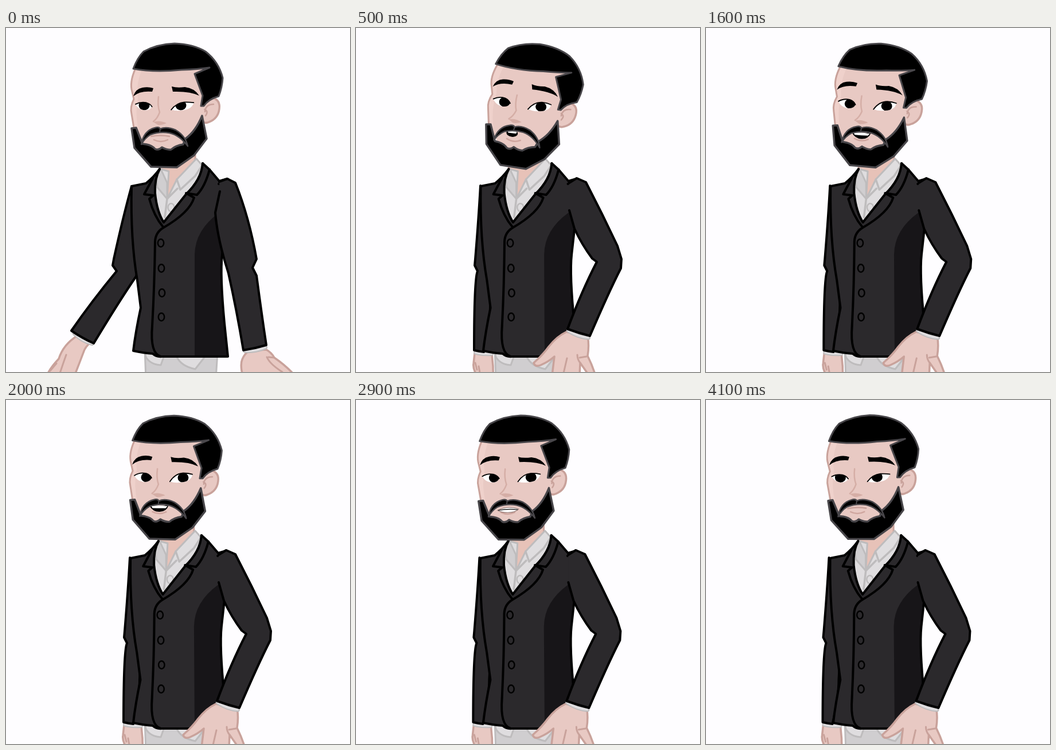
Write an HTML page with a canvas that moves like this. It is 600 by 600 pixels and loops after 4200 ms.

```html
<!DOCTYPE html>
<html lang="en">
<head>
<meta charset="utf-8">
<style>
html, body { margin: 0; width: 100%; height: 100%; overflow: hidden; background: #fefdff; }
canvas { display: block; width: 600px; height: 600px; }
</style>
</head>
<body>
<canvas id="stage" width="600" height="600"></canvas>
<script>
const ctx = document.getElementById("stage").getContext("2d");
const LOOP = 4200, STEP = 100;
const C = {
  bg: "#fefdff", skin: "#e8c9c3", glow: "#efd1cb", neck: "#e7c2b8", skinLine: "#c9a29b",
  shirt: "#dfdddf", shirtDark: "#d0ced0", shirtLine: "#bebcbd",
  suit: "#2b292c", shade: "#171518", hairLine: "#48464a"
};

const clamp = x => Math.max(0, Math.min(1, x));
const smooth = x => { x = clamp(x); return x * x * (3 - 2 * x); };
const mix = (a, b, k) => a + (b - a) * k;

// Interpolates the numbers of two path strings that share one structure.
function blend(a, b, k) {
  const to = b.match(/-?[\d.]+/g);
  let i = 0;
  return a.replace(/-?[\d.]+/g, n => mix(+n, +to[i++], k).toFixed(2));
}

function shape(d, fill, line, width) {
  const path = new Path2D(d);
  if (fill) { ctx.fillStyle = fill; ctx.fill(path); }
  if (line) { ctx.strokeStyle = line; ctx.lineWidth = width; ctx.stroke(path); }
  return path;
}

function oval(x, y, rx, ry, fill, line, width) {
  ctx.beginPath();
  ctx.ellipse(x, y, rx, ry, 0, 0, Math.PI * 2);
  if (fill) { ctx.fillStyle = fill; ctx.fill(); }
  if (line) { ctx.strokeStyle = line; ctx.lineWidth = width; ctx.stroke(); }
}

// Each pair: arms open, arms down.
const ARMS = {
  left: [
    "M219 276 Q204 330 188 403 L186 414 L193 424 Q150 476 114 528 Q133 541 153 550 Q195 480 227 433 L240 380 Z",
    "M217 275 Q214 330 208 403 L207 414 L212 424 Q206 438 206 562 Q214 564 223 565 Q234 520 234 487 L240 380 Z"],
  leftCuff: ["M120 533 Q133 546 150 550", "M209 566 Q220 569 236 568"],
  leftHand: [
    "M148 548 Q138 556 135 566 Q126 590 118 610 L70 610 Q74 596 92 577 Q100 552 124 537 Z",
    "M237 568 Q238 580 239 590 Q239 600 240 612 L215 612 Q203 596 205 585 Q206 576 207 567 Z"],
  leftFinger: ["M105 570 Q100 584 94 602 M88 585 L77 598", "M214 590 Q215 596 217 606 M208 584 L211 596"],
  right: [
    "M372 268 L386 263 L400 270 Q424 330 437 403 L430 418 L437 432 Q446 500 454 553 Q434 559 414 562 Q402 490 388 428 L382 408 Q368 360 365 322 L373 285",
    "M372 270 L385 262 L401 269 Q430 325 456 380 L463 403 L462 419 Q441 460 408 537 Q388 532 369 525 Q394 458 420 408 L412 402 Q394 378 381 350 L372 318"],
  rightCuff: ["M417 563 Q435 564 452 557", "M371 528 Q388 539 405 540"],
  rightHand: [
    "M454 561 Q463 566 468 575 Q487 588 502 604 L484 605 L476 606 L470 608 L420 612 L420 611 Q416 610 414 605 Q412 602 411 598 Q409 585 412 578 Q416 568 424 563 Z",
    "M404 538 Q407 553 404 572 Q412 588 417 604 L405 604 L391 584 L390 606 L342 606 L346 573 Q336 582 322 588 Q312 592 310 584 Q326 570 336 556 Q350 538 367 530 Z"],
  rightFinger: [
    "M455 574 Q460 586 482 600 M468 575 L458 574 M430 604 L430 610",
    "M386 570 Q386 578 391 584 M402 573 L390 575 M368 576 L362 602"]
};

function drawArm(side, k) {
  const part = name => blend(...ARMS[side + name], k);
  shape(part("Hand"), C.skin, C.skinLine, 3.5);
  shape(part("Finger"), null, C.skinLine, 3);
  shape(part("Cuff"), null, C.shirtLine, 8);
  shape(part("Cuff"), null, C.shirt, 4);
  shape(part(""), C.suit, "#000", 4);
}

function drawTorso() {
  // Neck and shirt
  shape("M270 225 L266 262 L282 300 L330 250 L330 215 Z", C.neck, C.skinLine, 3);
  shape("M270 246 L259 262 L258 290 L266 322 L276 340 L316 290 L348 246 L332 228 L298 264 L281 298 L284 250 Z", C.shirt, C.shirtLine, 3);
  shape("M270 246 L262 262 L264 278 L281 298 L281 270 Z", C.shirtDark, C.shirtLine, 3);
  shape("M281 298 L277 330 M298 264 L304 282 L330 258 L342 240 M281 298 L299 280", null, C.shirtLine, 3.5);
  oval(288, 313, 5.5, 7, null, C.shirtLine, 2.5);
  // Jacket
  shape("M268 246 Q258 260 244 271 L219 276 Q217 370 229 440 L235 488 Q226 530 222 563 Q240 567 256 568 Q262 574 272 573 L387 573 L381 515 Q373 430 378 395 L383 352 L396 270 L386 263 L372 267 L355 247 L343 236 Q340 262 314 290 L275 339 Q263 320 260 288 Q259 262 268 246 Z", C.suit);
  shape("M372 322 Q330 352 329 395 L329 572 L386 572 L380 515 Q373 430 377 395 L382 352 Z", C.shade);
  shape("M268 246 Q258 260 244 271 L219 276 Q217 370 229 440 L235 488 Q226 530 222 563 Q240 567 256 568 Q262 574 272 573 L387 573 L381 515 Q373 430 377 395 L382 352 M386 263 L372 267 L355 247 L343 236", null, "#000", 4);
  // Lapels and front edge
  shape("M268 246 Q259 262 260 288 Q263 320 275 339 L314 290 Q341 264 343 236 M256 262 L241 290 L257 292 L250 298 Q258 328 274 347 M355 247 Q347 277 333 291 L314 288 L328 296 Q320 322 275 348 Q261 356 260 372 Q259 450 255 520 Q251 568 270 573 M386 263 L371 272", null, "#000", 4);
  [[270, 375], [271, 419], [272, 462], [271, 504]].forEach(([x, y]) => oval(x, y, 5.2, 6.8, null, "#000", 2.5));
}

function drawHips() {
  shape("M242 560 L244 612 L366 612 L369 565 Z", C.shirtDark, C.shirtLine, 3);
  shape("M242 560 L244 574 Q252 587 270 588 L280 560 Z", C.shirt, C.shirtLine, 3);
  shape("M294 560 L298 574 Q306 590 330 595 L348 572 L346 560 Z", C.shirt, C.shirtLine, 3);
}

function drawEye(lid, low, x, pose) {
  const top = blend(...lid, 1 - pose.open), outline = top + blend(...low, 1 - pose.open);
  const path = shape(outline, "#fff");
  ctx.save();
  ctx.clip(path);
  oval(x + pose.gaze, 135, 9.5, 8.5, "#000");
  ctx.restore();
  shape(top, null, "#000", 1.8);
}

const MOUTHS = {
  closed() {
    shape("M253 189 Q270 186 285 189", null, C.skinLine, 2.5);
  },
  round() {
    oval(266, 187, 10, 6.5, "#000");
    shape("M258 184 Q266 178 274 184 L273 187 L259 187 Z", "#fff");
  },
  smile() {
    shape("M253 185 Q270 183 286 184 Q282 195 270 195 Q259 195 253 185 Z", "#000");
    shape("M256 185 Q270 183 284 185 L281 188.5 Q269 189 258 188.5 Z", "#fff");
  },
  teeth() {
    shape("M252 192 Q270 183 289 190 Q283 196 270 196 Q259 196 252 192 Z", "#fff", "#8d706b", 1);
    shape("M254 192 Q270 189 287 191", null, "#222", 1.3);
  }
};
const SPEECH = [[0, "closed"], [200, "round"], [700, "smile"], [2900, "teeth"], [3600, "closed"]];

function drawHead(pose, mouth) {
  ctx.save();
  ctx.translate(267 + pose.x, 243 + pose.y);
  ctx.rotate(pose.tilt);
  ctx.translate(-267, -243);

  // Ear and face
  shape("M343 134 Q350 122 361 122 Q374 126 372 141 Q370 158 354 164 Q346 168 340 160 Z", C.skin, C.skinLine, 3.5);
  shape("M362 133 Q348 133 347 146 M346 142 Q354 145 348 153", null, C.skinLine, 2.5);
  shape("M228 66 Q216 90 219 107 L223 124 Q216 138 219 150 L224 180 L250 215 L310 215 L344 165 L350 60 Z", C.skin);
  shape("M228 66 Q216 90 219 107 L223 124 Q216 138 219 150 L224 180 L232 180 Q224 150 230 122 Q226 95 240 66 Z", C.glow);
  shape("M228 66 Q216 90 219 107 L223 124 Q216 138 219 150 L224 180", null, C.skinLine, 3);
  shape("M266 120 Q264 135 268 147 Q264 158 257 163", null, "#d5aea6", 2.5);
  shape("M257 164 Q268 160 280 166 Q270 170 265 169 Z", "#d5aea6");

  // Eyes and brows
  drawEye(["M226 132 Q235 126 246 128 Q253 130 256 136", "M226 138 Q233 142 238 143 Q243 144 247 144"],
    ["Q253 144 241 143 Q230 141 226 132 Z", "Q242 146 236 145 Q230 143 226 138 Z"], 241, pose);
  drawEye(["M288 142 Q297 128 311 127 Q320 127 327 129", "M289 146 Q300 145 310 143 Q320 141 329 137"],
    ["Q326 141 308 143 Q297 145 288 142 Z", "Q318 145 308 146 Q296 147 289 146 Z"], 305, pose);
  ctx.save();
  ctx.translate(0, pose.brow);
  shape("M222 119 Q226 106 238 104 Q248 102 257 105 L255 111 Q234 109 222 119 Z", "#000");
  ctx.translate(0, -pose.brow * 0.5);
  shape("M289 102 Q298 105 312 103 Q329 105 337 118 Q321 110 291 111 Z", "#000");
  ctx.restore();

  // Hair
  shape("M222 71 Q229 52 240 41 Q264 28 294 27 Q326 28 348 41 Q371 59 378 87 Q377 104 371 119 Q353 124 345 136 L340 136 L343 118 L329 80 L355 69 Q335 72 306 73 Q258 78 222 71 Z", "#000", C.hairLine, 3);

  // Beard, mouth, moustache
  ctx.save();
  ctx.translate(0, pose.jaw);
  shape("M219 175 L227 174 L238 202 L245 203 Q255 205 260 211 Q266 214 272 208 Q281 213 288 212 Q296 205 309 203 L313 193 Q331 180 342 153 L350 193 L328 222 L298 243 L253 242 L224 209 Z", "#000", C.hairLine, 3.5);
  shape("M258 195 Q270 201 282 195", null, "#cfa69f", 2.5);
  ctx.restore();
  MOUTHS[mouth]();
  shape("M236 203 Q240 179 260 174 Q267 172 269 176 Q280 171 296 178 Q313 188 317 206 Q303 187 285 183 Q268 180 252 186 Q242 192 236 203 Z", "#000", C.hairLine, 2.5);
  shape("M269 176 L268 182", null, C.hairLine, 2);
  ctx.restore();
}

const FIELDS = ["tilt", "x", "y", "brow", "open", "gaze", "jaw"];
const KEYS = [
  [0, 0, 0, 0, 0, 0.85, 0, 0],
  [450, 0.13, -1, -4, -8, 1, 5, 3],
  [700, 0.13, -1, -4, -8, 1, 5, 0],
  [1250, 0.13, -1, -4, -8, 1, 5, 0],
  [1900, 0.01, -3, 0, -6, 1, 6, 0],
  [2600, 0, -4, 1, -6, 1, 6, 0],
  [3100, -0.015, -5, 0, -6, 0.9, 6, 1],
  [3200, -0.015, -5, 0, -6, 0, 3, 1],
  [3400, -0.015, -5, 0, -6, 0, 0, 1],
  [3500, -0.015, -5, 0, -6, 0.85, 0, 0],
  [4200, -0.015, -5, 0, -6, 0.85, 0, 0]
];

function poseAt(t) {
  const i = KEYS.findIndex(key => key[0] > t);
  const a = KEYS[i - 1], b = KEYS[i], k = smooth((t - a[0]) / (b[0] - a[0]));
  return Object.fromEntries(FIELDS.map((name, n) => [name, mix(a[n + 1], b[n + 1], k)]));
}

function draw(t) {
  const lower = smooth(t / 450), drift = -2.5 * clamp((t - 600) / 3500);
  const lean = -1.5 * lower + drift * 0.4;
  ctx.fillStyle = C.bg;
  ctx.fillRect(0, 0, 600, 600);
  ctx.lineJoin = ctx.lineCap = "round";

  drawHips();
  ctx.save();
  ctx.translate(drift, 0);
  drawArm("left", lower);
  ctx.restore();

  ctx.save();
  ctx.transform(1, 0, -lean / 300, 1, lean * 570 / 300, 0);
  drawTorso();
  ctx.restore();

  ctx.save();
  ctx.translate(drift, 0);
  drawArm("right", lower);
  ctx.restore();

  drawHead(poseAt(t), SPEECH.filter(([start]) => start <= t).pop()[1]);
}

const begin = performance.now();
function tick() {
  const t = (performance.now() - begin) % LOOP;
  draw(Math.floor(t / STEP) * STEP);
  requestAnimationFrame(tick);
}
tick();
</script>
</body>
</html>
```
